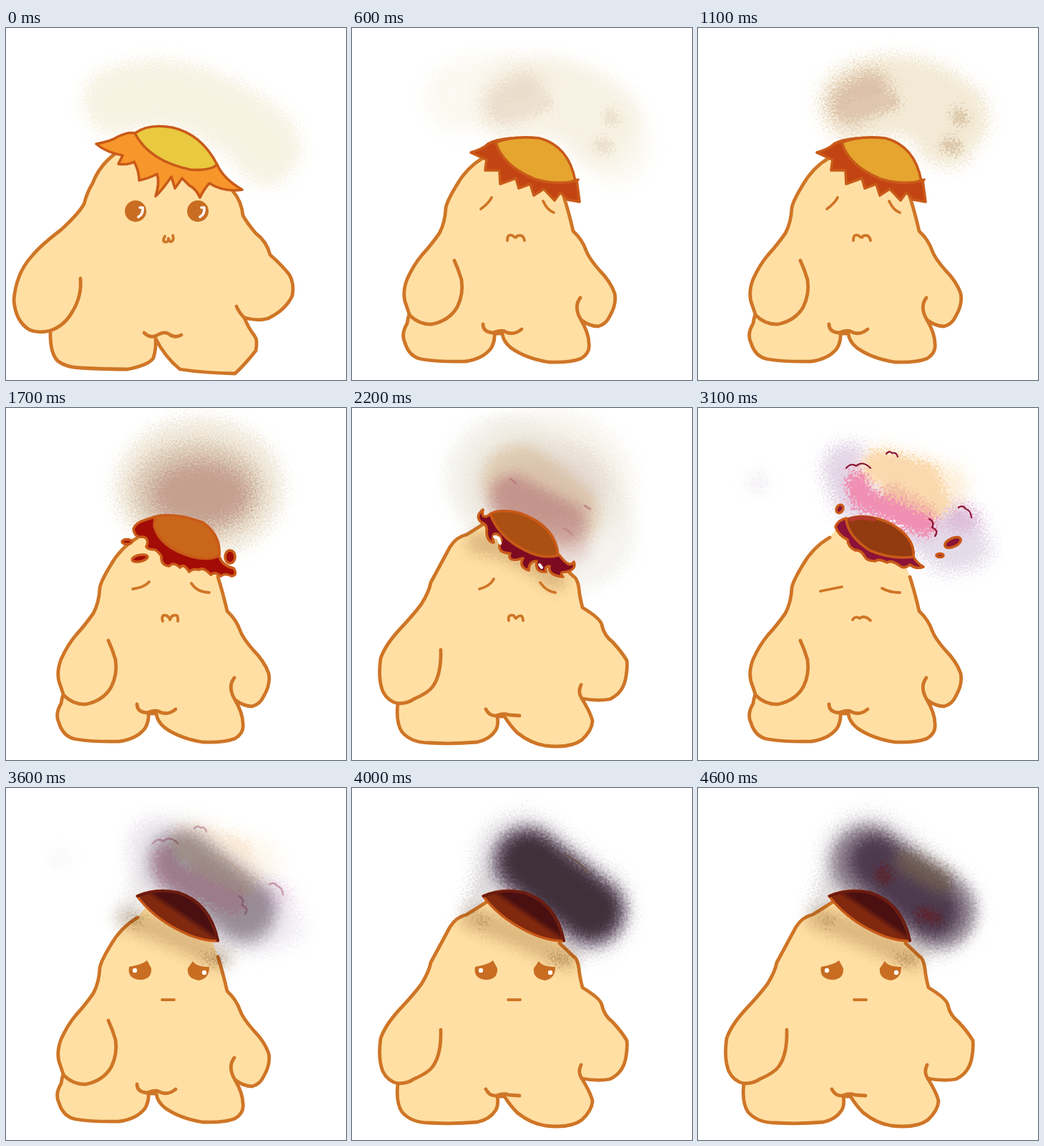
An HTML page without scripts that plays this animation: 475x492 px, repeating every 4700 ms.

```html
<!DOCTYPE html>
<html lang="en">
<head>
<meta charset="utf-8">
<title>Smouldering puff</title>
<style>
html, body { margin: 0; width: 100%; height: 100%; overflow: hidden; background: #fff }
svg { display: block; width: 100vw; height: 100vh }
path { stroke-linecap: round; stroke-linejoin: round }

.skin { fill: #ffdfa3; stroke: #cf7526; stroke-width: 4.8 }
.line { fill: none; stroke: #cf7526; stroke-width: 4.8 }
.face { fill: none; stroke: #cf7526; stroke-width: 3.8 }
.eye { fill: #c86d22 }
.rim { stroke: #c95a18; stroke-width: 3.6 }
.smoke path { fill: none }
.dust { filter: url(#dust) }
.soft { filter: url(#soft) }
.fine { filter: url(#fine) }
.shade { fill: none; stroke: #ddd3c8; mix-blend-mode: multiply }

/* smoke layers melt into each other in tenths of a second */
.smoke > g { transform-origin: 260px 150px; animation: 4.7s steps(6) infinite }
.smoke > .s0 { animation-name: s0 }
.smoke > .s1 { animation-name: s1 }
.smoke > .s2 { animation-name: s2 }
.smoke > .s3 { animation-name: s3 }
.smoke > .s4 { animation-name: s4 }
.smoke > .s5 { animation-name: s5 }
.smoke > .s6 { animation-name: s6 }
@keyframes s0 { 0% { opacity: 1; transform: none } 23.4%, 100% { opacity: 0; transform: translateY(-8px) scale(1.08) } }
@keyframes s1 { 0% { opacity: 0; transform: scale(.94) } 23.4% { opacity: 1; transform: none } 36.1%, 100% { opacity: 0; transform: translateY(-8px) scale(1.08) } }
@keyframes s2 { 0%, 23.4% { opacity: 0; transform: scale(.94) } 36.1% { opacity: 1; transform: none } 55.3%, 100% { opacity: 0; transform: translateY(-8px) scale(1.08) } }
@keyframes s3 { 0%, 36.1% { opacity: 0; transform: scale(.94) } 55.3% { opacity: 1; transform: none } 65.9%, 100% { opacity: 0; transform: translateY(-8px) scale(1.08) } }
@keyframes s4 { 0%, 55.3% { opacity: 0; transform: scale(.94) } 65.9% { opacity: 1; transform: none } 85.1%, 100% { opacity: 0; transform: translateY(-8px) scale(1.08) } }
@keyframes s5 { 0%, 65.9% { opacity: 0; transform: scale(.94) } 85.1% { opacity: 1; transform: none } 97.8%, 100% { opacity: 0; transform: none } }
@keyframes s6 { 0%, 85.1% { opacity: 0 } 97.8%, 100% { opacity: 1 } }

/* drawings that swap without a blend */
.pose, .head { visibility: hidden; animation: 4.7s step-end infinite }
.wide { animation-name: wide }
.slim { animation-name: slim }
.lean { animation-name: lean }
.squat { animation-name: squat }
@keyframes wide { 0% { visibility: visible } 6.3%, 100% { visibility: hidden } }
@keyframes slim {
  10.6%, 23.4%, 36.1%, 48.9%, 61.7%, 74.4%, 87.2% { visibility: visible }
  0%, 17%, 29.7%, 42.5%, 55.3%, 68%, 80.8%, 93.6%, 100% { visibility: hidden }
}
@keyframes lean {
  6.3%, 17%, 29.7%, 42.5%, 55.3%, 68%, 80.8%, 93.6% { visibility: visible }
  0%, 10.6%, 23.4%, 34%, 46.8%, 59.5%, 72.3%, 85.1%, 97.8%, 100% { visibility: hidden }
}
@keyframes squat {
  34%, 46.8%, 59.5%, 72.3%, 85.1%, 97.8%, 100% { visibility: visible }
  0%, 36.1%, 48.9%, 61.7%, 74.4%, 87.2% { visibility: hidden }
}
.h0 { animation-name: h0 }
.h1 { animation-name: h1 }
.h2 { animation-name: h2 }
.h3 { animation-name: h3 }
.h4 { animation-name: h4 }
.h5 { animation-name: h5 }
@keyframes h0 { 0% { visibility: visible } 12.7%, 100% { visibility: hidden } }
@keyframes h1 { 0%, 29.7%, 100% { visibility: hidden } 12.7% { visibility: visible } }
@keyframes h2 { 0%, 46.8%, 100% { visibility: hidden } 29.7% { visibility: visible } }
@keyframes h3 { 0%, 61.7%, 100% { visibility: hidden } 46.8% { visibility: visible } }
@keyframes h4 { 0%, 76.5%, 100% { visibility: hidden } 61.7% { visibility: visible } }
@keyframes h5 { 0% { visibility: hidden } 76.5%, 100% { visibility: visible } }
</style>
</head>
<body>
<svg viewBox="0 0 475 492">
<defs>
  <filter id="dust" filterUnits="userSpaceOnUse" x="0" y="0" width="475" height="492" color-interpolation-filters="sRGB">
    <feGaussianBlur stdDeviation="9" result="blur"/>
    <feTurbulence type="fractalNoise" baseFrequency=".4" numOctaves="2" seed="4"/>
    <feDisplacementMap in="blur" scale="48" xChannelSelector="R" yChannelSelector="G"/>
  </filter>
  <filter id="soft" filterUnits="userSpaceOnUse" x="0" y="0" width="475" height="492" color-interpolation-filters="sRGB">
    <feGaussianBlur stdDeviation="9" result="blur"/>
    <feTurbulence type="fractalNoise" baseFrequency=".3" numOctaves="2" seed="4"/>
    <feDisplacementMap in="blur" scale="14" xChannelSelector="R" yChannelSelector="G"/>
  </filter>
  <filter id="fine" filterUnits="userSpaceOnUse" x="0" y="0" width="475" height="492" color-interpolation-filters="sRGB">
    <feGaussianBlur stdDeviation="3" result="blur"/>
    <feTurbulence type="fractalNoise" baseFrequency=".3" numOctaves="2" seed="9"/>
    <feDisplacementMap in="blur" scale="40" xChannelSelector="R" yChannelSelector="G"/>
  </filter>
  <linearGradient id="char" gradientUnits="userSpaceOnUse" x1="230" y1="194" x2="256" y2="156">
    <stop offset=".4" stop-color="#80290f"/><stop offset=".6" stop-color="#4a0f10"/>
  </linearGradient>
</defs>

<g class="smoke">
  <g class="s0"><g class="dust">
    <path d="M155 102Q220 78 290 112T365 168" stroke="#f7f2e2" stroke-width="94"/>
    <path d="M345 170L365 185" stroke="#f7f2e2" stroke-width="70"/>
  </g></g>
  <g class="s1">
    <g class="dust">
      <path d="M225 105Q290 75 350 125" stroke="#f3ead5" stroke-width="112"/>
      <path d="M335 160L355 165" stroke="#f3ead5" stroke-width="60"/>
      <path d="M213 105L240 88" stroke="#dbc0a7" stroke-width="58"/>
    </g>
    <g class="fine">
      <path d="M215 112L270 103" stroke="#dfc7ae" stroke-width="22"/>
      <path d="M364 122l4 5M348 163l10 2" stroke="#d5bd9c" stroke-width="20" opacity=".75"/>
    </g>
  </g>
  <g class="s2"><g class="dust">
    <ellipse cx="270" cy="112" rx="118" ry="98" fill="#efe7d6" opacity=".85"/>
    <ellipse cx="268" cy="116" rx="92" ry="68" fill="#dac7b3"/>
    <ellipse cx="272" cy="120" rx="68" ry="44" fill="#c5a091"/>
  </g></g>
  <g class="s3">
    <g class="dust">
      <path d="M215 95L310 170" stroke="#e7e4da" stroke-width="178" opacity=".85"/>
    </g>
    <g class="soft">
      <path d="M232 100L295 150" stroke="#d3b791" stroke-width="108"/>
      <path d="M215 135L310 195" stroke="#c99c9b" stroke-width="52" opacity=".7"/>
      <path d="M221 122L300 162" stroke="#a5584f" stroke-width="62"/>
    </g>
    <path d="M220 97l8 7M327 136l8 5M297 169q8 3 12 9" stroke="#8c2430" stroke-width="2.5"/>
  </g>
  <g class="s4">
    <g class="dust">
      <path d="M210 85L225 125M320 170L365 190" stroke="#dccbe0" stroke-width="72" opacity=".8"/>
      <path d="M82 104h3" stroke="#e6dfe8" stroke-width="18"/>
      <path d="M260 85L345 112" stroke="#fdf0dc" stroke-width="66"/>
      <path d="M365 155L375 160" stroke="#dcb8d8" stroke-width="40"/>
      <path d="M345 205L385 195" stroke="#e6deeb" stroke-width="56" opacity=".7"/>
    </g>
    <g class="fine">
      <path d="M255 82L315 98L328 130" stroke="#fad9ae" stroke-width="46"/>
      <path d="M270 120L320 148" stroke="#f3bfa4" stroke-width="28"/>
      <path d="M222 104L228 126L316 164" stroke="#f08fb2" stroke-width="32"/>
    </g>
    <path d="M207 84Q214 76 221 81Q230 73 241 84M263 64q4-5 8-1q6-2 8 5M364 139q6-4 10 2q7 2 8 12M323 155q8 4 4 12q10 4 4 12" stroke="#8d1636" stroke-width="2.3"/>
  </g>
  <g class="s5">
    <g class="dust">
      <path d="M238 102L325 170" stroke="#e0dde0" stroke-width="136" opacity=".7"/>
      <path d="M190 125L175 165" stroke="#cdc8c8" stroke-width="34" opacity=".6"/>
    </g>
    <g class="soft">
      <path d="M244 102L334 172" stroke="#75637a" stroke-width="98"/>
      <path d="M248 103L334 170" stroke="#40303a" stroke-width="76"/>
    </g>
    <path d="M295 92Q317 101 333 121" stroke="#6f564d" stroke-width="2"/>
  </g>
  <g class="s6">
    <g class="dust">
      <path d="M238 102L325 170" stroke="#e0dde0" stroke-width="136" opacity=".7"/>
      <path d="M190 125L175 165" stroke="#cdc8c8" stroke-width="34" opacity=".6"/>
    </g>
    <g class="soft">
      <path d="M238 103L335 172" stroke="#8b7d8c" stroke-width="104"/>
      <path d="M248 102L328 172" stroke="#4e3a4e" stroke-width="72"/>
      <path d="M292 102L340 130" stroke="#6c5a53" stroke-width="34"/>
    </g>
    <path class="fine" d="M259 118l1 8M314 176l18 5" stroke="#5c2630" stroke-width="18"/>
  </g>
</g>

<path d="M184 181L200 160L285 205L296 236Z" fill="#ffdfa3"/>
<g class="pose wide">
  <path class="skin" d="M152 176Q130 193 121 217Q113 230 109 246Q101 260 77 282Q48 304 36 319Q14 343 11 380Q13 410 33 422Q45 427 62 423Q61 455 73 466Q84 474 103 475Q140 477 170 477Q200 471 206 461Q210 448 209 434Q222 460 243 477Q275 482 320 483Q334 470 349 451Q352 436 347 430Q338 418 333 405Q352 410 366 406Q391 394 400 374Q403 357 396 345Q386 332 369 317Q364 298 349 287Q337 273 331 262Q329 242 317 228"/>
  <path class="line" d="M62 423Q82 416 93 396Q106 375 104 350M333 405Q325 397 322 389M193 426Q201 434 210 430Q222 423 228 428Q236 434 245 429"/>
</g>
<g class="pose slim">
  <path class="skin" d="M184 181Q160 195 146 220Q132 243 131 252Q130 272 122 287Q110 304 98 317Q86 331 77 351Q69 372 76 388L80 400Q78 406 77 413Q68 428 74 440Q80 460 98 463Q125 467 158 466Q182 463 194 448Q200 438 199 427L210 427Q211 438 222 447Q243 462 275 467Q305 468 320 462Q333 454 331 441Q331 427 320 408Q332 417 344 417Q355 414 360 403Q370 386 367 371Q361 354 346 339Q331 322 327 311Q322 296 309 284Q303 258 296 236"/>
  <path class="line" d="M80 401Q94 415 112 414Q136 409 147 390Q156 372 153 352Q149 338 143 325M320 408Q309 390 319 377M183 414Q183 425 197 426Q210 421 215 425Q226 430 237 421"/>
</g>
<g class="pose lean">
  <path class="skin" d="M189 167Q163 184 149 201Q140 216 136 231L122 262Q120 277 110 288L78 326Q60 347 61 372Q63 397 78 406Q77 414 75 420Q65 432 71 442Q81 462 101 465Q120 466 142 466Q168 466 184 458Q202 448 202 444Q205 438 203 428L213 430Q217 442 230 451Q255 468 285 469Q315 471 327 461Q338 450 334 436Q330 424 319 406Q340 411 352 408Q370 396 371 375Q371 362 358 349Q342 334 336 319Q328 299 312 291Q303 280 302 268Q297 248 290 235"/>
  <path class="line" d="M78 406Q95 413 112 410Q134 400 140 372Q142 350 135 334M319 406Q312 397 313 387M183 416Q185 427 196 428Q208 424 216 428Q228 430 238 424"/>
</g>
<g class="pose squat">
  <path class="skin" d="M187 160Q170 171 160 177Q146 180 137 194L110 244Q108 256 97 274Q85 290 66 310Q46 332 40 350Q36 378 43 396Q50 410 64 413Q61 440 70 453Q83 468 108 468Q140 470 175 467Q193 463 201 450Q205 443 203 431L213 431Q221 444 231 454Q250 469 270 472Q305 476 321 464Q335 451 336 438Q334 427 321 406Q343 410 360 407Q380 398 383 374Q385 362 384 353Q377 341 364 327Q352 318 349 303Q347 294 322 279Q318 264 317 252Q315 238 309 235L290 217"/>
  <path class="line" d="M64 413Q78 413 86 407Q107 398 113 389Q125 372 124 338M321 406Q315 397 320 387M187 421Q192 431 202 430Q212 426 219 429L234 430"/>
</g>

<g class="head h0">
  <path class="rim" fill="#f7962b" d="M126 162Q148 158 156 152Q170 145 180 147L295 191Q304 211 330 226Q305 230 284 217Q276 226 271 237Q265 224 256 220L246 210L236 224L231 208Q217 228 209 235Q215 216 211 204Q200 210 186 213Q186 200 179 187Q170 192 157 190L163 178Q140 174 126 162Z"/>
  <path class="rim" fill="#e9c93f" d="M180 147Q200 133 232 139Q273 148 295 191Q285 200 258 198Q200 186 180 147Z"/>
  <circle class="eye" cx="181" cy="256" r="15"/><circle class="eye" cx="268" cy="256" r="15"/>
  <path d="M187 251h4q1 9-6 13M273 251h4q1 9-6 13" fill="none" stroke="#fff" stroke-width="3.6"/>
  <path class="face" d="M222 291q-4 7 0 8q5 1 5-5q1 6 5 4q3-3 1-8"/>
</g>
<g class="head h1">
  <path class="rim" fill="#c24412" d="M166 174Q183 169 190 162L203 157L314 213L318 243L301 240L291 230L283 241L268 225L254 234L249 218L233 224L229 210L207 218L206 199L186 199L188 184Z"/>
  <path class="rim" fill="#e5a52f" d="M201 160Q225 150 262 154Q303 165 312 214Q285 220 255 211Q210 192 201 160Z"/>
  <path class="rim" fill="none" d="M308 214l8-2M190 162Q200 156 222 154"/>
  <path class="face" d="M180 253Q191 245 195 237M267 242Q273 255 282 258M217 297Q217 287 224 290Q230 295 230 291Q239 287 241 297"/>
</g>
<g class="head h2">
  <path class="rim" fill="#a30c06" d="M178 169Q181 160 196 156L208 152L298 208Q303 221 318 224Q324 234 315 235Q306 230 300 235Q292 228 286 233Q276 222 270 226Q260 224 256 229Q248 216 243 223Q234 214 228 221Q216 220 217 207Q212 200 208 198Q198 198 196 194Q201 182 191 180Q180 182 178 169Z"/>
  <path class="rim" fill="#c9661a" d="M208 152Q235 145 275 160Q300 177 298 206Q285 214 260 208Q215 195 207 165Z"/>
  <g class="rim" fill="#a30c06"><ellipse cx="169" cy="187" rx="7" ry="3.4"/><ellipse cx="187" cy="210" rx="11" ry="4.5" transform="rotate(-12 187 210)"/><ellipse cx="313" cy="208" rx="7" ry="9"/></g>
  <path class="face" d="M177 253Q193 251 200 243M259 245Q266 257 284 258M219 298Q216 288 224 290Q229 293 229 296Q231 288 239 290Q241 294 240 298"/>
</g>
<g class="head h3">
  <path class="soft shade" d="M175 188Q235 200 285 240" stroke-width="30"/>
  <path class="rim" fill="#7e0a22" stroke-width="3" d="M183 142Q171 152 181 160Q190 163 188 174Q189 187 198 188Q194 174 203 176Q212 182 206 192Q205 203 221 203Q217 214 231 212L239 210Q232 222 247 227Q247 214 258 214Q255 230 271 229Q268 221 276 221Q273 234 295 236Q288 229 299 229Q314 226 310 215Q304 225 290 206L194 148Q180 158 183 142Z"/>
  <path d="M199 180l6 2l2 7M262 219l3 4" fill="none" stroke="#fff" stroke-width="4"/>
  <path class="rim" fill="#aa5012" d="M193 148Q208 140 235 147Q285 165 288 206Q265 212 240 198Q205 180 193 148Z"/>
  <path class="face" d="M178 253Q193 249 198 239M263 244Q271 256 284 258M219 297Q217 288 226 290Q229 296 230 293Q238 286 239 297"/>
</g>
<g class="head h4">
  <path class="rim" fill="#8b1238" d="M192 166Q195 157 207 154L301 208Q306 217 315 222Q305 226 296 219Q288 226 281 220Q270 212 264 216Q252 210 248 214Q236 214 233 208Q228 198 220 199Q209 194 209 184Q196 178 192 166Z"/>
  <path class="rim" fill="#923b10" d="M207 156Q235 145 270 162Q304 182 301 208Q270 212 240 199Q210 180 207 156Z"/>
  <path d="M212 156Q230 151 246 156" fill="none" stroke="#b23a2a" stroke-width="6"/>
  <g class="rim" fill="#8b1238"><ellipse cx="198" cy="141" rx="4.5" ry="6" transform="rotate(30 198 141)"/><ellipse cx="356" cy="188" rx="12" ry="6" transform="rotate(-25 356 188)"/><ellipse cx="338" cy="206" rx="5" ry="2.5"/></g>
  <path class="face" d="M171 256L201 250M257 252Q268 258 282 258M216 296Q220 290 226 294Q232 289 241 297"/>
</g>
<g class="head h5">
  <path class="soft shade" d="M168 182Q220 198 300 238" stroke-width="34"/>
  <path class="fine shade" d="M178 184l6 2M280 236l18 5" stroke-width="10"/>
  <path class="rim" fill="url(#char)" d="M183 151Q210 139 240 146Q285 160 296 214Q270 214 240 198Q205 180 183 151Z"/>
  <path d="M184 151Q210 140 240 146Q285 160 296 213" fill="none" stroke="#6a1c12" stroke-width="4"/>
  <path class="eye" d="M172 250Q190 247 197 241L203 252Q204 268 186 268Q169 266 172 250ZM261 242Q266 250 284 250Q284 267 269 269Q252 266 254 252Z"/>
  <circle cx="180" cy="255" r="3.2" fill="#fff"/><circle cx="277" cy="258" r="3.2" fill="#fff"/>
  <path class="face" d="M218 296H235"/>
</g>
</svg>
</body>
</html>
```
